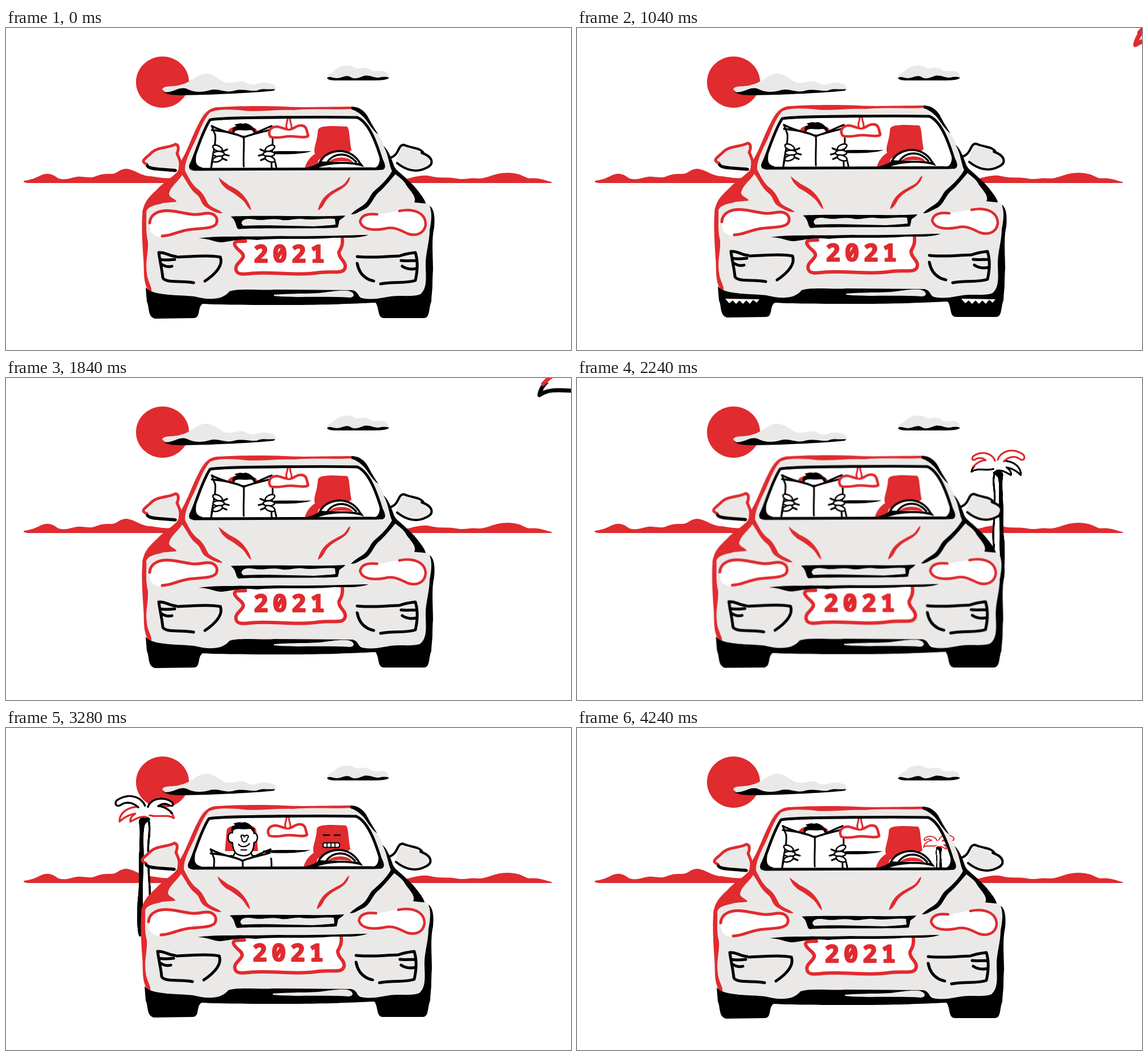
An HTML page that plays this animation: 991 by 565 pixels, repeating every 4320 ms.

```html
<!DOCTYPE html>
<html lang="en">
<head>
<meta charset="utf-8">
<title>Passenger seat</title>
<style>
  html, body { margin: 0; width: 100%; height: 100%; overflow: hidden; background: #fff; }
  svg { display: block; width: 991px; height: 565px; --red: #e02b2f; --grey: #ebe9e8; }
  path, ellipse { stroke-linecap: round; stroke-linejoin: round; }
  .red { fill: var(--red); }
  .grey { fill: var(--grey); }
  .white { fill: #fff; }
  .line { fill: none; stroke: #000; stroke-width: 4; }
  .rline { fill: none; stroke: var(--red); stroke-width: 5; }
  .leaf { fill: #fff; stroke-width: 3.3; }
  .upper { stroke: var(--a); }
  .lower { stroke: var(--b); }
  .plate { font: 800 42px "Noto Sans Mono", "DejaVu Sans Mono", monospace; letter-spacing: 8px;
    fill: var(--red); stroke: var(--red); stroke-width: 2.4; stroke-linejoin: round; }

  /* Everything moves on an 80 ms beat: 54 beats per loop. */
  .car, .book, .bot { animation: 4320ms -10ms infinite; }
  .car { animation-name: sway; }
  .book { animation-name: lower; }
  .bot { animation-name: show; animation-timing-function: step-end; }
  .tread { animation: roll 480ms -10ms step-end infinite; }
  .palm { animation: recede 4320ms calc(var(--start) * 1ms - 4330ms) infinite; }

  @keyframes recede {
    0% { transform: scale(2.88); animation-timing-function: steps(12); }
    22.222%, 100% { transform: scale(0); }
  }
  @keyframes sway {
    0% { transform: translate(0, 0); animation-timing-function: steps(3); }
    5.556% { transform: translate(1px, 2px); animation-timing-function: steps(4); }
    12.963% { transform: translate(1px, -2px); animation-timing-function: steps(6); }
    24.074% { transform: translate(2px, -2px); animation-timing-function: steps(5); }
    33.333% { transform: translate(0, 1px); animation-timing-function: steps(5); }
    42.593% { transform: translate(0, -1px); animation-timing-function: steps(5); }
    51.852% { transform: translate(-1.5px, -1.5px); animation-timing-function: steps(6); }
    62.963% { transform: translate(0, 1px); animation-timing-function: steps(7); }
    75.926% { transform: translate(-2px, -2px); animation-timing-function: steps(5); }
    85.185% { transform: translate(0, 2px); animation-timing-function: steps(5); }
    94.444% { transform: translate(0, 3px); animation-timing-function: steps(2); }
    98.148%, 100% { transform: translate(0, 0); }
  }
  @keyframes lower {
    0%, 55.556% { transform: translateY(0); animation-timing-function: steps(4); }
    62.963%, 88.889% { transform: translateY(43px); animation-timing-function: steps(4); }
    96.296%, 100% { transform: translateY(0); }
  }
  @keyframes show {
    0% { opacity: 0; }
    59.259% { opacity: 1; }
    88.889%, 100% { opacity: 0; }
  }
  @keyframes roll {
    0% { opacity: 0; }
    16.667% { opacity: 1; transform: translateY(0); }
    33.333% { opacity: 1; transform: translateY(9px); }
    50% { opacity: 1; transform: translateY(18px); }
    66.667%, 100% { opacity: 0; }
  }
</style>
</head>
<body>
<svg viewBox="0 0 991 565">
  <defs>
    <path id="glass" d="M358 161C380 156 580 156 616 157C636 165 650 200 662 243C661 248 650 247 640 247L330 248C322 247 322 243 326 236C335 215 345 180 358 161Z"/>
    <clipPath id="inside"><use href="#glass"/></clipPath>
    <mask id="cutout" maskUnits="userSpaceOnUse" x="0" y="0" width="991" height="565">
      <rect width="991" height="565" fill="#fff"/><use href="#glass"/>
    </mask>

    <g id="crown">
      <path class="white" d="M722 139L743 136L775 136L762 154L732 153Z"/>
      <path class="leaf lower" d="M726 139C712 139 700 147 698 158C710 150 722 157 738 153"/>
      <path class="leaf lower" d="M758 138C776 139 789 150 788 164C780 156 772 152 762 150C768 154 771 159 770 164C760 159 754 154 744 156"/>
      <path class="leaf upper" d="M741 138C736 123 714 119 701 130C697 136 701 138 706 135C713 131 719 133 724 137C716 137 707 142 701 149"/>
      <path class="leaf upper" d="M746 136C751 121 773 112 793 127C798 135 791 139 785 134C776 128 765 131 757 139"/>
    </g>
    <g id="trunk">
      <path class="white" d="M740 158L754 158L756 350L739 345Z"/>
      <path d="M737 160C741 152 757 153 756 166C753 185 756 200 755 212C758 235 754 270 758 300C760 330 759 362 755 366C748 367 751 340 749 310C751 280 747 240 748 210C749 190 748 172 745 168Z"/>
      <path class="line" style="stroke-width:3.500" d="M740 161C735 185 744 202 739 230C742 260 735 282 739 312L737 346"/>
    </g>
    <g id="tall" transform="translate(-497 -272)"><use href="#trunk"/><use href="#crown"/></g>
    <g id="short" transform="translate(-497 -272)">
      <use href="#trunk" transform="translate(0 20.8) scale(1 .87)"/><use href="#crown"/>
    </g>

    <g id="hand" class="white" stroke="#000" stroke-width="2.6">
      <ellipse cx="371" cy="211" rx="9" ry="4.5" transform="rotate(25 371 211)"/>
      <ellipse cx="373" cy="221" rx="10" ry="4.5"/>
      <ellipse cx="371" cy="230" rx="9" ry="4.5" transform="rotate(-20 371 230)"/>
      <path class="line" style="stroke-width:3" d="M381 216L388 213M383 222L391 224M380 229L387 232M362 235L360 244"/>
    </g>
    <path id="teeth" class="white" d="M258 477L318 478L313 484L307 479L301 486L295 480L289 486L283 480L277 486L271 480L265 485Z"/>
  </defs>

  <!-- sky and horizon -->
  <ellipse class="red" cx="274.500" cy="95" rx="46.500" ry="45"/>
  <path class="grey" d="M274 108C276 100 292 104 305 100C325 96 335 80 352 80C370 82 375 94 388 96C400 97 408 91 418 94C425 98 432 101 440 98C452 94 456 96 462 97C472 98 475 104 472 108C440 110 400 113 370 112C330 114 300 116 280 113Z"/>
  <path d="M275 112C285 117 290 118 310 118C370 117 430 114 470 110L472 107C460 109 450 105 440 110C425 111 415 106 400 110C385 115 372 105 358 109C345 113 330 113 320 108C310 102 300 108 294 110C288 112 280 114 275 112Z"/>
  <path class="grey" d="M563 88C562 80 572 80 578 73C588 64 604 64 611 69C618 74 622 68 632 70C642 72 640 77 650 76C660 74 672 75 671 87L563 89Z"/>
  <path d="M563 88C567 83 575 89 582 88C592 87 597 81 606 87C612 90 620 87 628 84C638 82 645 88 655 87C662 85 667 86 672 87C670 91 660 92 640 92L580 92C570 92 565 91 563 88Z"/>
  <path class="red" d="M32 268C45 266 50 264 60 259C75 252 83 258 92 264C105 268 115 262 125 261C135 260 145 264 155 261C170 255 175 256 185 256C195 256 200 246 212 247C228 250 235 258 250 260C262 260 275 266 300 262L300 272L38 272C30 271 30 269 32 268Z"/>
  <path class="red" d="M700 272L700 265C715 262 730 256 745 260C758 264 775 261 790 264C805 267 815 262 825 264C845 265 855 254 880 254C905 255 908 262 918 264C935 262 945 268 957 270L957 272Z"/>

  <!-- palms shrink towards the vanishing point -->
  <g transform="translate(497 272)">
    <g class="palm" style="--start:160;--a:var(--red);--b:#000"><use href="#tall" transform="translate(-7 2) scale(-1 .95)"/></g>
    <g class="palm" style="--start:880;--a:var(--red);--b:var(--red)"><use href="#short" transform="translate(0 13)"/></g>
    <g class="palm" style="--start:1600;--a:var(--red);--b:#000"><use href="#short" transform="translate(2 2)"/></g>
    <g class="palm" style="--start:2640;--a:#000;--b:var(--red)"><use href="#tall" transform="translate(10) scale(-1.1 1.04)"/></g>
    <g class="palm" style="--start:3440;--a:var(--red);--b:var(--red)"><use href="#short" transform="scale(1.15)"/></g>
  </g>

  <g class="car">
    <g clip-path="url(#inside)">
      <path d="M453 217C490 215 515 217 536 216C520 222 490 222 453 221Z"/>

      <!-- driver's seat and wheel -->
      <path class="red" d="M547 180C548 174 555 172 575 172L598 173C603 176 602 195 606 214C600 222 585 222 560 224L548 232L545 246L524 246C526 235 536 224 542 221C538 212 546 200 547 180Z"/>
      <g class="bot">
        <path class="line" style="stroke-width:2.5;stroke-linecap:butt" d="M558 190H570M577 190H589"/>
        <rect x="558" y="203.500" width="29" height="8" rx="3" fill="#fff" stroke="#000" stroke-width="2"/>
        <path class="line" style="stroke-width:1.800" d="M565 204V211M572 204V211M579 204V211"/>
      </g>
      <path class="white" d="M551 244C555 226 570 217 588 217C604 218 616 230 622 244Z"/>
      <path class="red" d="M566 236C573 225 602 224 609 236C595 233 580 233 566 236Z"/>
      <path class="line" style="stroke-width:3.500" d="M550 236C557 222 572 215 589 216C605 218 616 228 622 239M564 235C570 226 580 222 590 222C601 223 609 229 614 235"/>
      <path d="M528 245C540 242 546 238 552 234C575 236 600 233 624 238L628 244C605 236 570 237 548 245Z"/>

      <!-- passenger -->
      <path class="red" d="M389 182C391 168 441 168 441 182L444 218L386 218Z"/>
      <path class="white" d="M362 247L368 230L402 222L432 222L462 230L468 247Z"/>
      <path class="line" style="stroke-width:2.5" d="M405 219L398 231L412 246L418 236L426 245L436 231L431 219M398 226L368 233M436 226L464 233"/>
      <path class="white" stroke="#000" stroke-width="2.500" d="M399 186C389 184 389 204 399 203C400 215 404 222 409 224C416 227 424 227 430 223C435 218 437 210 437 203C445 203 445 185 437 187L436 178L400 178Z"/>
      <path d="M398 185C396 178 398 173 404 173L401 169C407 169 409 166 416 168L420 167C428 169 435 172 437 185C433 184 434 180 429 178C419 182 408 176 402 181Z"/>
      <path class="line" style="stroke-width:2.200" d="M415 194C412 190 418 188 420 193C422 188 430 190 426 195M416 196C414 203 424 204 425 197M410 206C414 212 424 211 429 205M414 216H424"/>

      <g class="book">
        <path class="white" d="M362 178C385 182 405 186 417 193C430 187 450 182 467 176L472 250L356 250Z"/>
        <path class="line" style="stroke-width:3.400" d="M361 179C384 181 405 186 417 192C430 186 450 183 465 178M361 172C372 178 388 183 404 187M466 172C452 177 440 184 429 188"/>
        <path class="line" style="stroke-width:3" d="M361 172L367 188C369 205 361 225 360 245M467 188C470 205 464 225 466 245M417 192C418 205 416 225 417 243"/>
        <use href="#hand"/>
        <use href="#hand" transform="matrix(-1 0 0 1 834 0)"/>
      </g>

      <path class="white" stroke="var(--red)" stroke-width="4.500" d="M464 191C458 182 464 173 475 173C484 174 488 178 496 178C505 178 508 171 517 171C528 171 527 180 530 189C526 194 510 190 500 190C486 190 475 195 464 191Z"/>
      <path class="white" stroke="var(--red)" stroke-width="3" d="M494 158C494 166 489 172 493 177C496 180 500 178 501 174C501 169 498 166 498 158Z"/>
    </g>

    <!-- door mirrors -->
    <path class="grey" d="M246 230C258 215 285 212 298 206C306 212 304 225 306 235C304 248 290 252 270 250C255 248 248 246 246 230Z"/>
    <path class="rline" d="M247 239C235 234 243 230 253 221C264 208 286 211 297 204C304 205 303 214 300 220C303 228 308 234 305 246"/>
    <path class="line" style="stroke-width:5.500" d="M248 242C252 249 275 247 297 250"/>
    <path class="grey" d="M684 235C690 220 690 210 698 207C715 214 730 215 742 228C748 238 735 250 715 251C700 250 690 245 684 235Z"/>
    <path class="line" d="M676 227C690 222 687 205 698 205C711 211 727 210 732 219M729 219C751 227 751 240 736 246C720 254 702 250 686 237"/>

    <!-- body -->
    <path class="grey" mask="url(#cutout)" d="M345 150C355 140 380 140 400 141L610 141C625 145 635 165 645 180C660 192 668 215 672 240C685 255 700 270 715 285C730 300 745 308 748 325L748 340C742 360 743 400 743 420C743 440 738 455 728 470C715 475 690 473 670 475C640 480 630 478 615 464C560 463 450 464 395 464C380 472 370 480 350 477C310 471 270 474 252 464C245 455 243 430 243 415C246 390 242 350 241 330C243 315 262 300 275 290C285 275 295 262 303 252C310 240 325 190 345 150Z"/>
    <use href="#glass" class="line" style="stroke-width:4.800"/>
    <path d="M322 248C324 238 329 234 334 222C332 235 332 242 345 245L340 250ZM655 222C667 237 668 249 658 249L640 248C652 245 657 240 655 222Z"/>

    <path class="red" d="M610 138C560 138 520 140 490 138C450 136 400 137 370 139C352 141 345 155 338 168C327 188 319 213 310 228C304 238 305 245 300 253C288 265 275 272 266 282C253 295 242 303 239 325L246 322C250 311 265 311 276 307L299 305C299 300 285 298 286 290C290 276 302 270 309 258C318 270 322 282 333 291C343 298 341 308 350 314C360 320 370 326 380 325C374 318 363 317 355 309C350 300 347 291 337 283C326 275 320 262 314 250C313 238 320 222 328 206C338 187 344 163 358 148C372 142 390 143 410 144C440 149 475 142 505 144C540 141 580 144 610 142Z"/>
    <path class="red" d="M240 318C237 345 239 375 241 405C243 425 239 448 252 464C261 460 248 447 247 430C244 410 250 395 249 375C244 355 247 340 246 320Z"/>
    <path d="M606 138C621 138 631 147 637 160C642 170 648 178 653 187C643 180 635 165 628 157C620 149 612 144 606 143Z"/>
    <path d="M684 248C700 262 715 275 722 285C730 295 735 302 736 308L716 306C722 295 705 283 700 272C694 264 688 261 680 254Z"/>
    <path d="M662 207C670 213 676 228 681 243L687 252C673 268 663 281 653 289C643 299 641 312 629 318C619 322 612 328 605 327C613 318 622 315 630 308C638 300 639 291 648 284C661 273 671 262 677 251C671 238 671 222 662 207Z"/>
    <path d="M743 312C753 318 752 340 751 350C746 370 749 400 749 425C747 445 750 470 742 480L718 480L728 466C740 455 736 432 736 415C736 395 743 375 743 355C746 340 748 325 743 312Z"/>

    <!-- bumper and tyres -->
    <path d="M245 455C255 470 300 468 330 471C350 476 378 480 392 462C410 456 450 461 470 459L608 460C619 463 617 472 625 474C650 479 665 470 690 470C710 470 728 472 735 460L748 440L746 480C741 492 744 509 733 509L662 509C651 508 655 490 648 482C600 484 560 486 500 486C440 486 380 486 345 484C335 490 342 508 330 509L262 510C248 508 252 490 247 480Z"/>
    <path class="grey" d="M470 468C500 465 520 467 550 465C570 463 580 460 600 461C612 464 613 472 603 473C560 470 500 474 470 470Z"/>
    <g class="tread"><use href="#teeth"/><use href="#teeth" x="414"/></g>

    <!-- lights -->
    <path class="white" d="M252 345C250 325 270 318 290 320C310 322 325 330 345 326C365 322 374 332 370 343C365 354 340 352 320 354C300 358 290 368 272 367C255 365 252 355 252 345Z"/>
    <path class="rline" d="M252 342C253 325 270 319 290 321C310 323 325 330 345 326C365 322 373 332 369 343C364 353 340 351 320 354C300 357 290 365 274 365"/>
    <path class="white" d="M620 340C622 328 635 325 650 326C670 327 685 319 705 319C725 318 737 328 737 345C735 360 720 367 705 362C690 355 680 348 665 352C645 356 625 354 620 340Z"/>
    <path class="rline" style="stroke-width:4.500" d="M690 321C715 316 736 324 736 345C734 360 720 366 705 361C690 354 680 348 665 352C645 356 625 354 621 340C623 328 635 325 651 327"/>
    <path class="line" style="stroke-width:5" d="M301 402C330 401 355 398 376 402C381 415 370 430 349 444M298 401C285 400 280 393 268 394C270 410 274 425 275 438C278 448 310 443 329 447M270 406C280 408 288 407 296 406M272 414C278 418 285 420 291 418"/>
    <path class="line" style="stroke-width:5" d="M616 401C635 404 660 401 690 400C700 396 710 395 718 394C723 410 721 430 718 443C700 449 682 444 657 449M616 413C618 424 623 434 634 440C639 443 642 443 645 444M693 408C702 409 710 408 720 408M695 418C702 423 710 424 720 422"/>

    <!-- bonnet, grille and plate -->
    <path class="red" d="M373 262C379 268 385 271 391 276C402 281 413 288 419 297C425 305 429 312 430 320C424 317 421 307 414 301C404 293 397 288 389 284C381 278 375 271 373 262Z"/>
    <path class="red" d="M604 261C602 274 592 281 580 287C570 293 563 299 559 307C556 313 552 318 547 320C549 310 554 301 561 294C570 286 581 281 590 276C597 272 598 264 604 261Z"/>
    <path d="M394 331C430 328 560 332 595 329C592 335 583 335 584 342L582 350C560 353 430 350 408 353C402 350 405 338 394 331Z"/>
    <path class="grey" d="M413 343C414 334 425 334 437 336C450 339 465 333 480 336C495 340 505 333 520 335C540 338 555 333 577 335L578 345C560 347 550 347 540 348C500 347 450 345 416 347Z"/>
    <path class="white" d="M400 377C410 374 420 368 430 369L590 368C598 380 580 385 584 395C590 405 600 410 598 420C595 432 580 425 560 428C520 436 470 428 440 430C420 434 405 436 403 424C404 412 416 410 414 400C412 390 398 388 400 377Z"/>
    <path class="rline" style="stroke-width:6" d="M420 374C408 375 400 373 401 380C404 390 418 393 416 402C412 411 400 415 404 426C408 436 425 430 440 430C470 428 515 435 550 429C575 426 592 433 595 420C597 409 583 405 584 393C589 384 591 379 590 369"/>
    <path d="M338 369C370 364 420 367 480 365C530 366 590 364 636 363C620 369 600 368 575 368C530 372 480 368 440 372C410 368 390 376 375 376C362 374 358 370 338 369Z"/>
    <text class="plate" x="434.500" y="411">2021</text>
  </g>
</svg>
</body>
</html>
```
